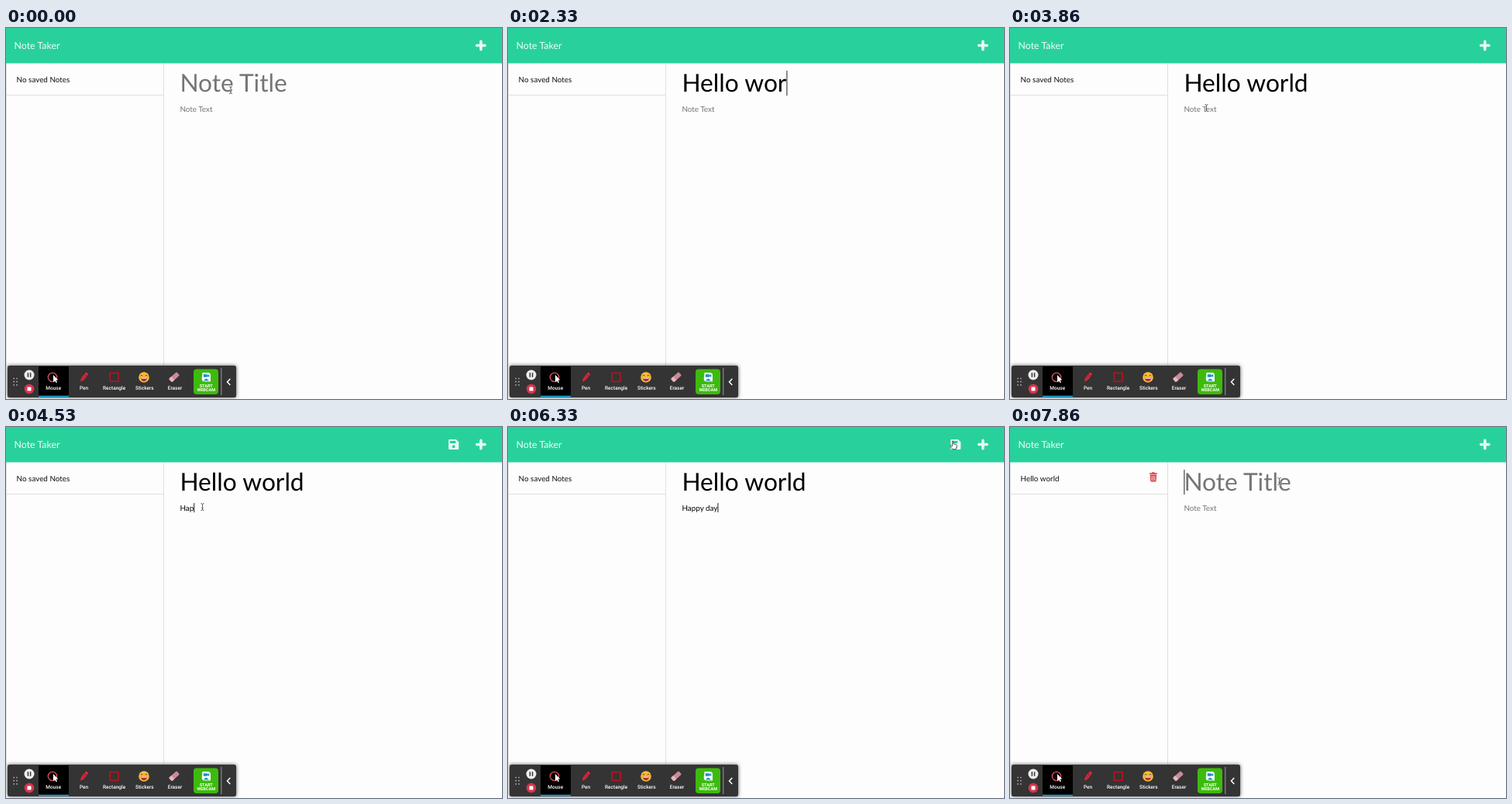
Recreate the animation shown at these times as an HTML page. Size 640 by 478 pixels, loop 8000 ms.

```html
<!DOCTYPE html>
<html lang="en">
<head>
<meta charset="utf-8">
<title>Note Taker</title>
<style>
  html, body { margin: 0; width: 100%; height: 100%; overflow: hidden; background: #fdfdfd; }
  svg { display: block; }
  text { font-family: Lato, sans-serif; font-size: 9.9px; white-space: pre; text-rendering: geometricPrecision; }
  .brand { font-size: 12.4px; fill: #f2fcf8; }
  .title { font-size: 31.7px; }
  .tools text { font: 500 6.5px Roboto, sans-serif; fill: #fff; text-anchor: middle; }
  .tools .cam { font-size: 5.5px; font-weight: 700; }
  .panel { filter: drop-shadow(0 0 2.5px rgba(0, 0, 0, .65)); }
</style>
</head>
<body>
<svg width="640" height="478" viewBox="0 0 640 478">
  <rect width="640" height="478" fill="#fdfdfd"/>
  <path d="M.5 45V436M203.5 45V436M0 86.5H203" stroke="#e0e0e0" fill="none"/>
  <rect width="640" height="45.5" fill="#28d19b"/>
  <text class="brand" x="10.5" y="27.3">Note Taker</text>
  <path d="M612.8 17.3V27.7M607.6 22.5H618" stroke="#e6faf3" stroke-width="3.6" stroke-linecap="round"/>
  <g id="save">
    <path d="M572.2 16H580.8L584.2 19.4V27.8Q584.2 29 583 29H572.2Q571 29 571 27.8V17.2Q571 16 572.2 16Z" fill="#e6faf3"/>
    <path d="M572.9 17.9H580.2V21H572.9Z" fill="#28d19b"/>
    <circle cx="577.6" cy="25.2" r="1.9" fill="#28d19b"/>
  </g>

  <text id="item" x="13.6" y="69.8" fill="#111"></text>
  <g id="trash" fill="#d93a48">
    <path d="M180 59.2H182.8L183.5 58.2H186.3L187 59.2H189.8V60.8H180ZM180.7 61.6H189.1L188.6 69.6Q188.5 70.6 187.5 70.6H182.3Q181.3 70.6 181.2 69.6Z"/>
    <path d="M182.9 63V69.2M184.9 63V69.2M186.9 63V69.2" stroke="#fdfdfd" stroke-width=".8"/>
  </g>
  <text id="title" class="title" x="224.4" y="82.2"></text>
  <text id="body" x="224.4" y="107.6"></text>
  <rect id="caret" width="1" fill="#222"/>

  <g class="tools">
    <rect class="panel" x="2" y="435" width="295" height="41" rx="2.5" fill="#343434"/>
    <rect x="42" y="436" width="39" height="39" fill="#000"/>
    <rect x="42" y="473.8" width="39" height="1.6" fill="#17b4e8"/>
    <path d="M10.2 451.5V461M14 451.5V461" stroke="#bbb" stroke-width="1.7" stroke-linecap="round" stroke-dasharray="0 4.2"/>
    <circle cx="30" cy="447" r="6.5" fill="#eee"/>
    <path d="M28.4 444.2V449.8M31.6 444.2V449.8" stroke="#333" stroke-width="1.5"/>
    <circle cx="30" cy="465" r="6.3" fill="#d5354c"/>
    <rect x="27.5" y="462.5" width="5" height="5" rx=".6" fill="#fff"/>

    <circle cx="60" cy="450" r="5.7" fill="none" stroke="#d95462" stroke-width="1.3"/>
    <path d="M61 447V456.2L63.1 454.3L64.6 457.2L66 456.5L64.6 453.7L67.3 453.4Z" fill="#fff"/>
    <g transform="translate(100.5 450) rotate(38)">
      <rect x="-2" y="-6.8" width="4" height="10" rx="1" fill="#e8283c"/>
      <path d="M-2 -3.5H2M0 -3V3" stroke="#8d1422" stroke-width=".8"/>
      <path d="M-2 3.2H2L0 7.3Z" fill="#e8283c"/>
    </g>
    <rect x="134.2" y="444.6" width="10.8" height="10.8" fill="none" stroke="#c2101c" stroke-width="1.5"/>
    <circle cx="178" cy="450" r="6.8" fill="#f7bd35"/>
    <path d="M173.7 450.3H182.3Q181.7 455.2 178 455.2Q174.3 455.2 173.7 450.3Z" fill="#b52a32"/>
    <path d="M174 450.4H182L181.5 451.8H174.5Z" fill="#fff"/>
    <path d="M173.6 448.3Q175.2 446 176.6 448.3M179.4 448.3Q180.8 446 182.4 448.3" stroke="#60391b" stroke-width=".9" fill="none"/>
    <g transform="translate(217 449.8) rotate(-42)">
      <rect x="-6.8" y="-3" width="13.6" height="6" rx="1.3" fill="#c98b98"/>
      <path d="M-5.5 -3H-2.3V3H-5.5Q-6.8 3 -6.8 1.7V-1.7Q-6.8 -3 -5.5 -3Z" fill="#e6b6be"/>
    </g>

    <rect x="242" y="439.5" width="32" height="32.5" rx="4" fill="#3dbb0d"/>
    <path d="M253.5 444H260.5Q264 444 264 447.5V455.5H256.5Q252.7 455.5 252.7 451.7Z" fill="#f2fbff"/>
    <path d="M254.8 446.2H259.8V449.8H254.8ZM259.8 447.5L262.3 446.2V449.8L259.8 448.8Z" fill="#218bc9"/>
    <path d="M255.2 454.4Q258 449.3 261.6 454.4Z" fill="#218bc9"/>
    <path d="M277.8 438V473" stroke="#999" stroke-width="1"/>
    <path d="M289.3 452L285.5 456L289.3 460" fill="none" stroke="#fff" stroke-width="1.5"/>
    <text x="61.3" y="466.2">Mouse</text>
    <text x="100.5" y="466.2">Pen</text>
    <text x="139.6" y="466.2">Rectangle</text>
    <text x="178.8" y="466.2">Stickers</text>
    <text x="218" y="466.2">Eraser</text>
    <text class="cam" x="258.2" y="463">START</text>
    <text class="cam" x="258.2" y="468.4">WEBCAM</text>
  </g>

  <g id="beam" fill="none">
    <path d="M-2 -4.5Q0 -4.5 0 -3Q0 -4.5 2 -4.5M0 -3V3M-2 4.5Q0 4.5 0 3Q0 4.5 2 4.5M-1.2 1.3H1.2" stroke="#fff" stroke-width="2" opacity=".7"/>
    <path d="M-2 -4.5Q0 -4.5 0 -3Q0 -4.5 2 -4.5M0 -3V3M-2 4.5Q0 4.5 0 3Q0 4.5 2 4.5M-1.2 1.3H1.2" stroke="#555" stroke-width=".9"/>
  </g>
  <path id="arrow" d="M0 -4V5.5L2.2 3.5L3.8 6.8L5.3 6.1L3.8 3H6.7Z" fill="#111" stroke="#fff" stroke-width=".8"/>
  <path id="hand" d="M-1.7 -4.6Q-1 -5.6 -.2 -4.6V-1.2L3.2 -.4Q4.3 0 4.1 1.3L3.2 5.6H-1.5L-4.3 1.7Q-4 .3 -2.7 .9L-1.7 1.8Z" fill="#fff" stroke="#333" stroke-width=".8"/>
</svg>

<script>
const LOOP = 8000, SAVED = 6600;
const $ = id => document.getElementById(id);
const [save, item, trash, title, body, caret, beam, arrow, hand] =
  ['save', 'item', 'trash', 'title', 'body', 'caret', 'beam', 'arrow', 'hand'].map($);

const titleKeys = [1000, 1200, 1400, 1600, 1760, 1900, 2000, 2130, 2260, 2600, 2900];
const bodyKeys = [4260, 4400, 4530, 4660, 4800, 4930, 5000, 5130, 5220];
const clicks = [[500, title], [3900, body], [7500, title]];

// time, x, y of the mouse
const path = [
  [0, 290, 80], [130, 290, 80], [500, 287, 65.5], [3200, 287, 65.5], [3730, 253.5, 103],
  [5550, 253.5, 103], [6200, 575, 23], [6750, 575, 23], [7350, 347.5, 70], [LOOP, 347.5, 70]
];

const count = (keys, t) => keys.filter(k => k <= t).length;
const show = (el, on) => el.setAttribute('visibility', on ? 'visible' : 'hidden');

function setField(el, text, hint) {
  el.textContent = text || hint;
  el.setAttribute('fill', text ? '#000' : '#757575');
  el.end = 224.4 + (text ? el.getComputedTextLength() : 0);
}

function mouseAt(t) {
  const i = path.findIndex(p => p[0] > t);
  const [t0, x0, y0] = path[i - 1], [t1, x1, y1] = path[i];
  const u = (t - t0) / (t1 - t0), e = u * u * (3 - 2 * u);
  return [x0 + (x1 - x0) * e, y0 + (y1 - y0) * e];
}

function drawCaret(t) {
  const click = clicks.filter(c => c[0] <= t).pop();
  const gone = t >= SAVED && t < 7500;
  if (!click || gone) return show(caret, false);
  const [time, field] = click;
  const keys = field === title ? titleKeys : bodyKeys;
  const since = Math.max(time, ...keys.filter(k => k <= t));
  show(caret, (t - since) % 1000 < 500);
  caret.setAttribute('x', field.end);
  caret.setAttribute('y', field === title ? 55 : 98);
  caret.setAttribute('height', field === title ? 32 : 12);
}

function drawMouse(t) {
  const [x, y] = mouseAt(t);
  const hidden = t > 1200 && t < 3200;
  const kind = y > 46 ? beam : x > 568 ? hand : arrow;
  for (const el of [beam, arrow, hand]) show(el, el === kind && !hidden);
  kind.setAttribute('transform', `translate(${x} ${y})`);
}

function draw(t) {
  const saved = t >= SAVED;
  const typed = count(bodyKeys, t);
  setField(title, saved ? '' : 'Hello world'.slice(0, count(titleKeys, t)), 'Note Title');
  setField(body, saved ? '' : 'Happy day'.slice(0, typed), 'Note Text');
  item.textContent = saved ? 'Hello world' : 'No saved Notes';
  show(trash, saved);
  show(save, typed > 0 && !saved);
  drawCaret(t);
  drawMouse(t);
}

const start = performance.now();
function tick() {
  draw((performance.now() - start) % LOOP);
  requestAnimationFrame(tick);
}
tick();
</script>
</body>
</html>
```
